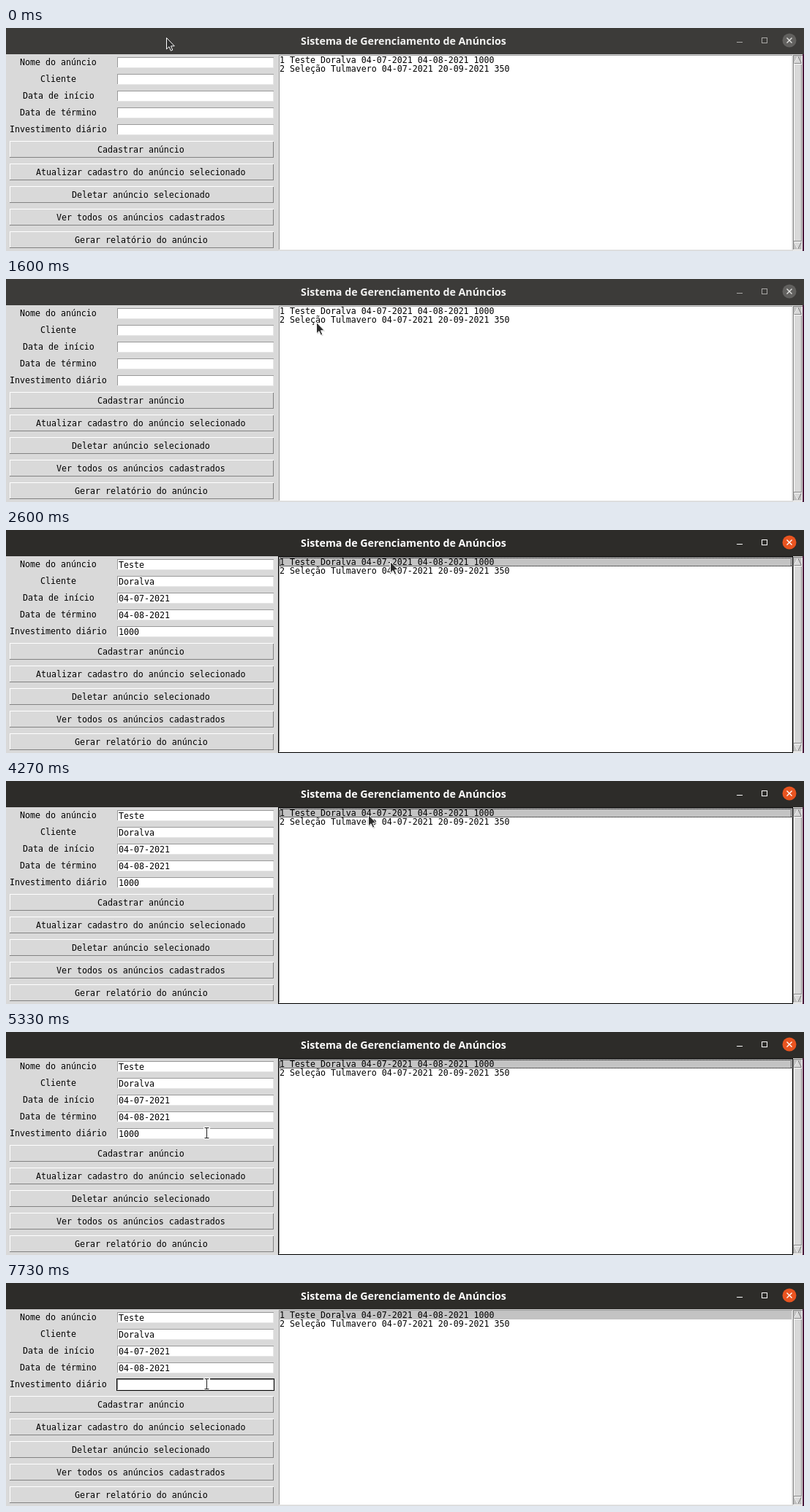
An HTML page for the animation above (8 s loop, 1091 by 306 pixels).

```html
<!DOCTYPE html>
<html lang="pt-BR">
<head>
<meta charset="utf-8">
<title>Sistema de Gerenciamento de Anúncios</title>
<style>
  html, body { margin: 0; width: 100%; height: 100%; overflow: hidden; background: #d9d9d9; }
  svg { display: block; }
  rect { shape-rendering: crispEdges; }
  text { white-space: pre; }
  /* 11.627px gives cells of 7px */
  .mono { font: 11.627px "DejaVu Sans Mono", monospace; }
  .title { font: bold 14.23px "Open Sans", "Noto Sans", sans-serif; text-anchor: middle; }
</style>
</head>
<body>
<svg id="stage" width="1091" height="306" viewBox="0 0 1091 306"></svg>
<script>
const LOOP = 8000, CELL = 7;
const FACE = '#d9d9d9', DARK = '#828282', WHITE = '#fff', BLACK = '#000';
const stage = document.getElementById('stage');

function add(tag, attrs, parent = stage) {
  const node = document.createElementNS('http://www.w3.org/2000/svg', tag);
  for (const key in attrs) node.setAttribute(key, attrs[key]);
  return parent.appendChild(node);
}
const box = (x, y, width, height, fill) => add('rect', { x, y, width, height, fill });

function bevel(x, y, w, h, topLeft, bottomRight, fill) {
  box(x, y, w, h, bottomRight);
  box(x, y, w, 1, topLeft);
  box(x, y, 1, h - 1, topLeft);
  box(x + 1, y + 1, w - 2, h - 2, fill);
}
const raised = (x, y, w, h) => bevel(x, y, w, h, WHITE, DARK, FACE);
const well = (x, y, w, h) => bevel(x, y, w, h, '#999', '#e6e6e6', WHITE);

function outline(x, y, w, h, extra) {
  return add('rect', { x: x + .5, y: y + .5, width: w - 1, height: h - 1, fill: 'none', stroke: BLACK, ...extra });
}
function write(x, y, str) {
  const node = add('text', { x, y, class: 'mono' });
  node.textContent = str;
  return node;
}
const writeMid = (mid, y, str) => write(Math.floor(mid - str.length * CELL / 2), y, str);
const show = (node, on) => node.setAttribute('visibility', on ? 'visible' : 'hidden');

// Window and title bar
box(0, 0, 1091, 306, FACE);
const bar = box(0, 0, 1091, 36, '#3c3b39');
box(1089, 36, 2, 270, '#4a1a3c');
const title = add('text', { x: 543.5, y: 23, class: 'title' });
title.textContent = document.title;
const minimise = box(999, 19, 8, 1, WHITE);
const maximise = add('rect', { x: 1033.5, y: 13.5, width: 7, height: 7, fill: 'none' });
const close = add('circle', { cx: 1071, cy: 17, r: 9.5 });
const cross = add('path', { d: 'M1067.5 13.5l7 7m0-7l-7 7', 'stroke-width': 1.4 });

// Form
const labels = ['Nome do anúncio', 'Cliente', 'Data de início', 'Data de término', 'Investimento diário'];
const record = ['Teste', 'Doralva', '04-07-2021', '04-08-2021', '1000'];
const fields = labels.map((label, i) => {
  const y = 39 + 23 * i;
  writeMid(72, y + 12, label);
  well(152, y + 1, 214, 15);
  return write(154, y + 13, '');
});
const fieldFocus = outline(151, 131, 216, 17);
const caret = box(153, 134, 2, 11, BLACK);

['Cadastrar anúncio', 'Atualizar cadastro do anúncio selecionado', 'Deletar anúncio selecionado',
 'Ver todos os anúncios cadastrados', 'Gerar relatório do anúncio'].forEach((label, i) => {
  const y = 155 + 31 * i;
  raised(5, y, 361, 23);
  writeMid(185, y + 16, label);
});

// List
well(373, 37, 702, 268);
const selection = box(374, 38, 700, 12, '#c3c3c3');
const activeRow = outline(374, 38, 700, 12, { 'stroke-dasharray': '1 1' });
write(374, 48, '1 ' + record.join(' '));
write(374, 60, '2 Seleção Tulmavero 04-07-2021 20-09-2021 350');
const listFocus = outline(372, 36, 704, 270);

// Scrollbar
bevel(1076, 37, 13, 268, DARK, WHITE, '#c3c3c3');
raised(1077, 49, 11, 244);
function arrowButton(tip, base) {
  add('path', { d: `M1082.5 ${tip}L1077.5 ${base}H1087.5Z`, fill: FACE, stroke: DARK });
  add('path', { d: `M1082.5 ${tip}L1077.5 ${base}${tip > base ? 'H1087.5' : ''}`, fill: 'none', stroke: WHITE });
}
arrowButton(38.5, 48.5);
arrowButton(303.5, 293.5);

// Pointers, each drawn around its hot spot
const arrow = add('g');
const arrowPath = 'M.5 .5V16L4 12.7L6.4 18.2L8.8 17.2L6.5 11.8H11.3Z';
add('path', { d: arrowPath, transform: 'translate(1 1)', fill: BLACK, opacity: .2 }, arrow);
add('path', { d: arrowPath, fill: '#2d2d2d', stroke: WHITE, 'stroke-linejoin': 'round' }, arrow);
const beam = add('g');
const beamPath = 'M-2.5 -6.5H3.5M.5 -6.5V7.5M-2.5 7.5H3.5';
add('path', { d: beamPath, fill: 'none', stroke: WHITE, 'stroke-width': 3, 'stroke-linecap': 'square' }, beam);
add('path', { d: beamPath, fill: 'none', stroke: '#222' }, beam);

// Start time, x, y
const moves = [
  [0, 219, 13], [800, 226, 14], [930, 242, 18], [1000, 264, 23], [1070, 291, 30],
  [1130, 317, 38], [1200, 347, 45], [1400, 394, 50],
  [1600, 424, 59], [1670, 466, 63], [1800, 508, 53], [1930, 525, 43],
  [4130, 521, 41], [4270, 495, 46], [4330, 475, 51], [4470, 445, 63],
  [4670, 402, 77], [4730, 376, 84], [4870, 342, 98], [5000, 312, 113],
  [5130, 290, 126], [5270, 280, 134], [5330, 274, 138]
];
const SELECT = 2600, EDIT = 5530;
const deletions = [6670, 6870, 7000, 7130];
const blinks = [EDIT, 5930, 6270, 6870, 7530, 7730];

function draw(t) {
  const past = times => times.filter(s => t >= s).length;
  const selected = t >= SELECT, editing = t >= EDIT;

  bar.setAttribute('fill', selected ? '#2d2c29' : '#3c3b39');
  title.setAttribute('fill', selected ? WHITE : '#f2f2f1');
  const icon = selected ? WHITE : '#a9a8a6';
  minimise.setAttribute('fill', icon);
  maximise.setAttribute('stroke', icon);
  close.setAttribute('fill', selected ? '#e95420' : '#62615f');
  cross.setAttribute('stroke', selected ? WHITE : '#e4e4e2');

  const left = record[4].length - past(deletions);
  fields.forEach((field, i) => {
    field.textContent = selected ? (i === 4 ? record[i].slice(0, left) : record[i]) : '';
  });
  show(selection, selected);
  show(activeRow, selected && !editing);
  show(listFocus, selected && !editing);
  show(fieldFocus, editing);
  show(caret, past(blinks) % 2 === 1);
  caret.setAttribute('x', 153 + left * CELL);

  const [, x, y] = moves[past(moves.map(m => m[0])) - 1];
  const overField = y > 36 && x > 150 && x < 368;
  show(arrow, !overField);
  show(beam, overField);
  (overField ? beam : arrow).setAttribute('transform', `translate(${x} ${y})`);
}

function tick() {
  draw(performance.now() % LOOP);
  requestAnimationFrame(tick);
}
tick();
</script>
</body>
</html>
```
